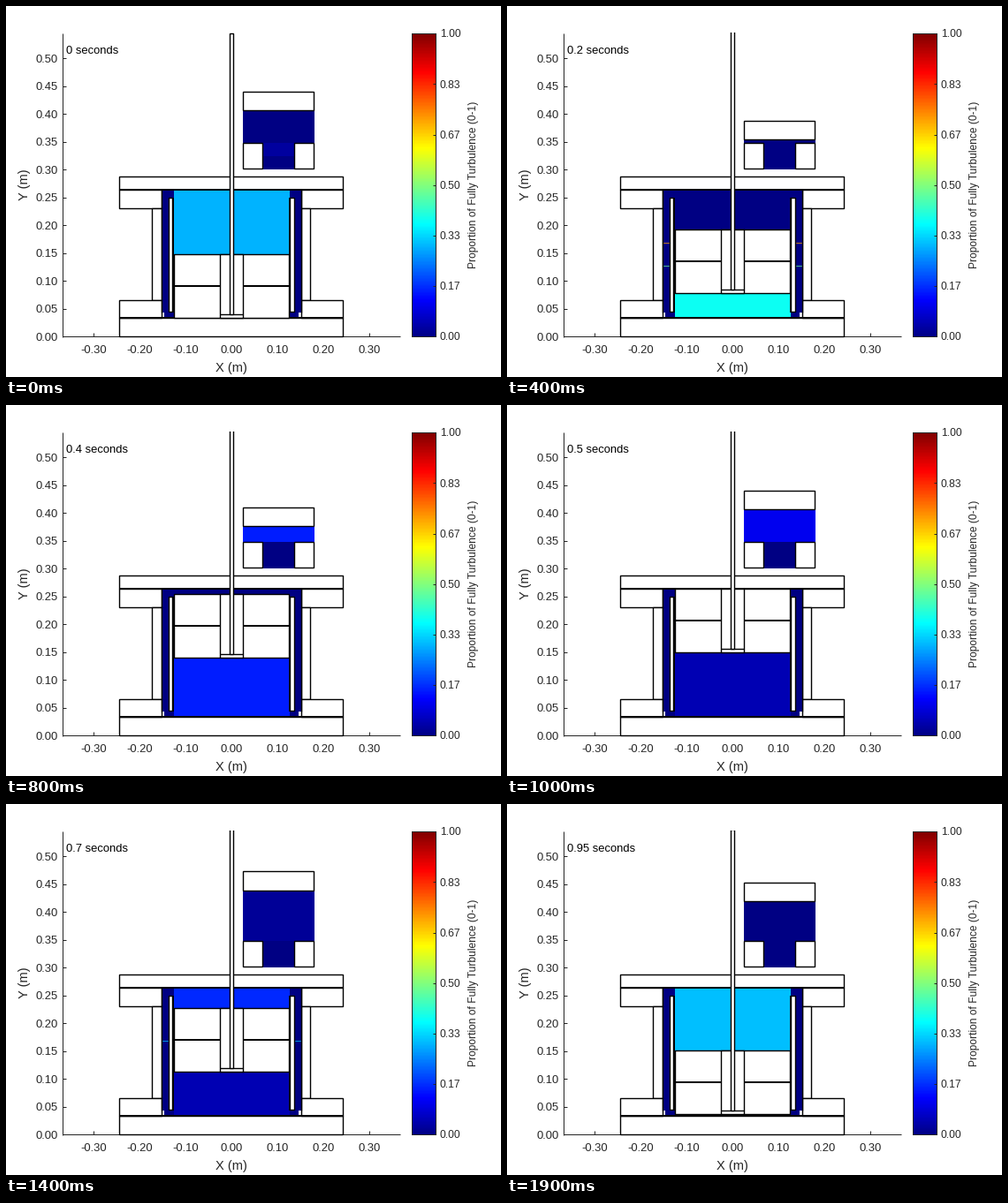
Animation, 560 px wide and 420 px high, one loop 2 s. Source, as a matplotlib script:

```python
import numpy as np
import matplotlib.pyplot as plt
from matplotlib.animation import FuncAnimation
from matplotlib.patches import Rectangle

W, H, DPI = 560, 420, 100
FRAMES, INTERVAL = 20, 100
PX = 72 / DPI
GREY = "#262626"
MID = 255  # axis of symmetry
SHADES = 256

plt.rcParams["font.family"] = "Liberation Sans"
plt.rcParams["axes.unicode_minus"] = False


def jet(value):
    """Jet colour for a value from 0 to 1."""
    v = (min(SHADES - 1, int(value * SHADES)) + 1) / SHADES
    return tuple(np.clip([1.5 - abs(4 * v - c) for c in (3, 2, 1)], 0, 1))


def pulse(t, start, peak, end, height, power=3):
    """Linear rise, curved fall; times past 1 wrap into the next cycle."""
    if t < start:
        t += 1
    if t <= peak:
        return height * (t - start) / (peak - start)
    return height * max(0, 1 - ((t - peak) / (end - peak)) ** power)


fig = plt.figure(figsize=(W / DPI, H / DPI), dpi=DPI, facecolor="white")
ax = fig.add_axes([0, 0, 1, 1])
ax.axis("off")
layers = iter(range(1, 500))


def box(x0, y0, x1, y1, lw=1.4):
    return ax.add_patch(Rectangle((x0, y0), x1 - x0, y1 - y0, fc="white",
                                  ec="black", lw=lw * PX,
                                  zorder=next(layers)))


def gas(x0, y0, x1, y1, alpha=1):
    return ax.add_patch(Rectangle((x0, y0), x1 - x0, y1 - y0, fc=jet(0),
                                  ec="none", lw=0, alpha=alpha,
                                  zorder=next(layers)))


def line(x0, y0, x1, y1, color="black", lw=1.0):
    return ax.plot([x0, x1], [y0, y1], color=color, lw=lw * PX,
                   solid_capstyle="butt", zorder=next(layers))[0]


def label(x, y, s, size, color=GREY, **kw):
    return ax.text(x, y, s, fontsize=size * PX, color=color,
                   zorder=next(layers), **kw)


def span(patch, y0, y1):
    patch.set_y(y0)
    patch.set_height(y1 - y0)


# Axes
line(64, 30.5, 64, 374.5, GREY)
line(63.5, 374, 446, 374, GREY)
for k in range(-3, 4):
    x = MID + 52 * k
    line(x, 370, x, 374, GREY)
    label(x - 0.5, 392.5, f"{k / 10:.2f}", 13, ha="center")
for k in range(11):
    y = 374 - 31.5 * k
    line(64, y, 68, y, GREY)
    label(58.5, y + 4.7, f"{k / 20:.2f}", 13, ha="right")
label(MID, 413.5, "X (m)", 14.67, ha="center")
label(27.5, 202, "Y (m)", 14.67, ha="right", va="center", rotation=90)
clock = label(67.5, 53.5, "", 13, "black")

# Colour bar
shades = [[jet(i / SHADES)] for i in range(SHADES)]
ax.imshow(shades, extent=(458.5, 486.5, 374.5, 30.5), origin="lower",
          aspect="auto", interpolation="nearest", zorder=next(layers))
ax.images[0].set_extent((458.5, 486.5, 374.5, 30.5))
box(459, 31, 486, 374, 1).set(fill=False, edgecolor=GREY)
for k in range(7):
    y = 374 - 343 * k / 6
    line(483, y, 486, y, GREY)
    label(490.5, y + 4.2, f"{k / 6:.2f}", 12)
label(528.5, 202, "Proportion of Fully Turbulence (0-1)", 12, ha="center",
      va="center", rotation=90)

# The quarter pixel keeps snapped edges on whole pixels
ax.set(xlim=(-0.25, W - 0.25), ylim=(H - 0.25, -0.25))

# Housing
box(128, 193, 381, 208)
box(128, 353, 381, 374)
for x0, x1, c0, c1 in ((128, 176, 165, 176), (334, 381, 334, 344)):
    box(x0, 208, x1, 229)
    box(c0, 229, c1, 333)
    box(x0, 333, x1, 353)

# Gas around and inside the cylinder
gas(176.5, 208.5, 333.5, 346.5)
gas(179, 346, 331, 353)
low = gas(189.5, 208.5, 320.5, 353)
high = gas(189.5, 208.5, 320.5, 281)
sides = (176.5, 326.5)
upper_films = [gas(x, 267.5, x + 7, 268.5, 0.75) for x in sides]
lower_films = [gas(x, 293.5, x + 7, 294.5, 0.75) for x in sides]
cells = [gas(x, 286, x + 7, 293.5) for x in sides]
for wall, x0, x1, inner in ((176, 184, 188, 189), (334, 321, 326, 321)):
    line(wall, 208, wall, 347, lw=1.4)
    box(x0, 217, x1, 346)
    line(inner, 216.5, inner, 346.5, lw=2)
line(128, 208, 381, 208, lw=2)
line(128, 353, 381, 353, lw=2)

# Displacer with its rod
body = box(190, 281, 320, 353)
hub = box(242, 281, 268, 353)
discs = [line(a, 317, b, 317, lw=2) for a, b in ((190, 242), (268, 320))]
seat = line(242, 349, 268, 349, lw=1.4)
rod = box(253, 30.5, 257, 349)
rod.set_clip_path(Rectangle((0, 29.5), W, H, transform=ax.transData))

# Power cylinder
chamber = gas(267.5, 118, 348.5, 155)
gas(289.5, 154.5, 326.5, 184.5)
neck = gas(289.5, 154.5, 326.5, 170)
box(268, 155, 290, 184)
box(326, 155, 348, 184)
piston = box(268, 96.5, 348, 118)


def levels(t):
    """Each gas region with its turbulence at cycle time t."""
    film = max(pulse(t, 0.05, 0.25, 0.4, 0.95),
               pulse(t, 0.65, 0.8, 0.95, 0.95))
    return (
        ([high], pulse(t, 0.42, 0.95, 1.1, 0.31)),
        ([low], max(0.05, pulse(t, 0.68, 1.27, 1.42, 0.435))),
        ([chamber], pulse(t, 0.3, 0.38, 0.75, 0.16, 1)),
        ([neck], pulse(t, 0.95, 1.1, 1.2, 0.09)),
        (cells, pulse(t, 0, 0.1, 0.2, 0.06)),
        (upper_films, film),
        (lower_films, pulse(t, 0.1, 0.3, 0.38, 0.95)),
    )


def update(i):
    t = i / FRAMES
    a = 2 * np.pi * t
    top = 281 - 36.4 * (1 - np.cos(a)) - 1.7 * (1 - np.cos(2 * a))
    head = 99.9 + 28.2 * np.sin(a) - 3.6 * np.cos(2 * a)

    body.set_y(top)
    hub.set_y(top)
    for d in discs:
        d.set_ydata([top + 36] * 2)
    seat.set_ydata([top + 68] * 2)
    span(rod, top - 250.5, top + 68)
    span(high, 208.5, top)
    span(low, top + 72, 353)
    piston.set_y(head)
    span(chamber, head + 21.5, 155)

    for parts, level in levels(t):
        for p in parts:
            p.set_facecolor(jet(level))
    clock.set_text(f"{t:g} seconds")
    return []


anim = FuncAnimation(fig, update, frames=FRAMES, interval=INTERVAL,
                     init_func=lambda: update(0), repeat=True,
                     repeat_delay=0, blit=False)
plt.show()
```
